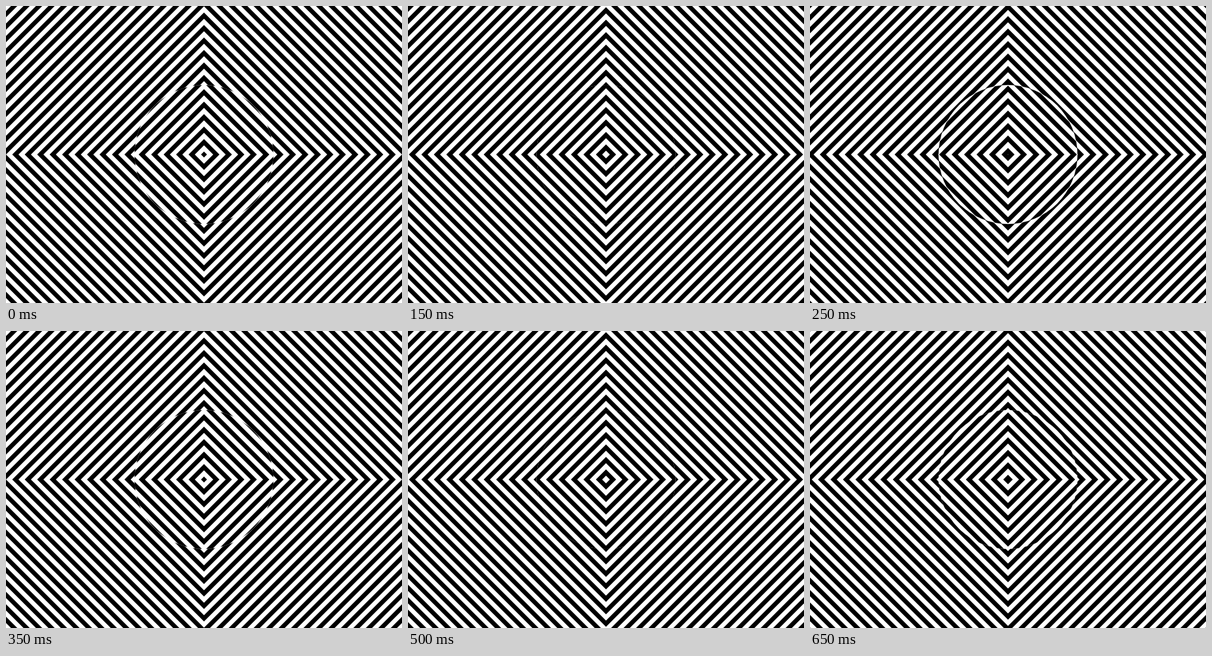
Recreate the animation shown at these times as an HTML page. Size 667 by 500 pixels, loop 0.7 s.

```html
<!DOCTYPE html>
<html lang="en">
<head>
<meta charset="utf-8">
<title>Opposing diamonds</title>
<style>
  html, body { margin: 0; width: 100%; height: 100%; overflow: hidden; background: #fff; }
  svg { display: block; width: 667px; height: 500px; }
</style>
</head>
<body>
<svg viewBox="0 0 667 500">
  <defs>
    <clipPath id="disc"><circle cx="333.5" cy="250" r="117"/></clipPath>
  </defs>
  <rect width="667" height="500" fill="#fff"/>
  <path id="outer" fill-rule="evenodd"/>
  <g clip-path="url(#disc)">
    <rect width="667" height="500" fill="#fff"/>
    <path id="inner" fill-rule="evenodd"/>
  </g>
</svg>
<script>
  const CX = 333.5, CY = 250;
  const PERIOD = 21, BAND = PERIOD / 2;
  const STEPS = 7, STEP_MS = 50, SHIFT = PERIOD / STEPS;
  const outer = document.getElementById('outer');
  const inner = document.getElementById('inner');

  const diamond = r =>
    `M${CX} ${CY - r}L${CX + r} ${CY}L${CX} ${CY + r}L${CX - r} ${CY}Z`;

  // Black bands whose outer edges lie at edge + k * PERIOD.
  function rings(edge, limit) {
    let d = '';
    for (let r = edge % PERIOD; r < limit + PERIOD; r += PERIOD) {
      if (r > 0) d += diamond(r);
      if (r > BAND) d += diamond(r - BAND);
    }
    return d;
  }

  function draw(ms) {
    const step = Math.floor(ms / STEP_MS) % STEPS;
    outer.setAttribute('d', rings(8 + SHIFT * step, CX + CY));
    inner.setAttribute('d', rings(26 - SHIFT * step, 170));
  }

  let start;
  function tick(now) {
    if (start === undefined) start = now;
    draw(now - start);
    requestAnimationFrame(tick);
  }
  draw(0);
  requestAnimationFrame(tick);
</script>
</body>
</html>
```
